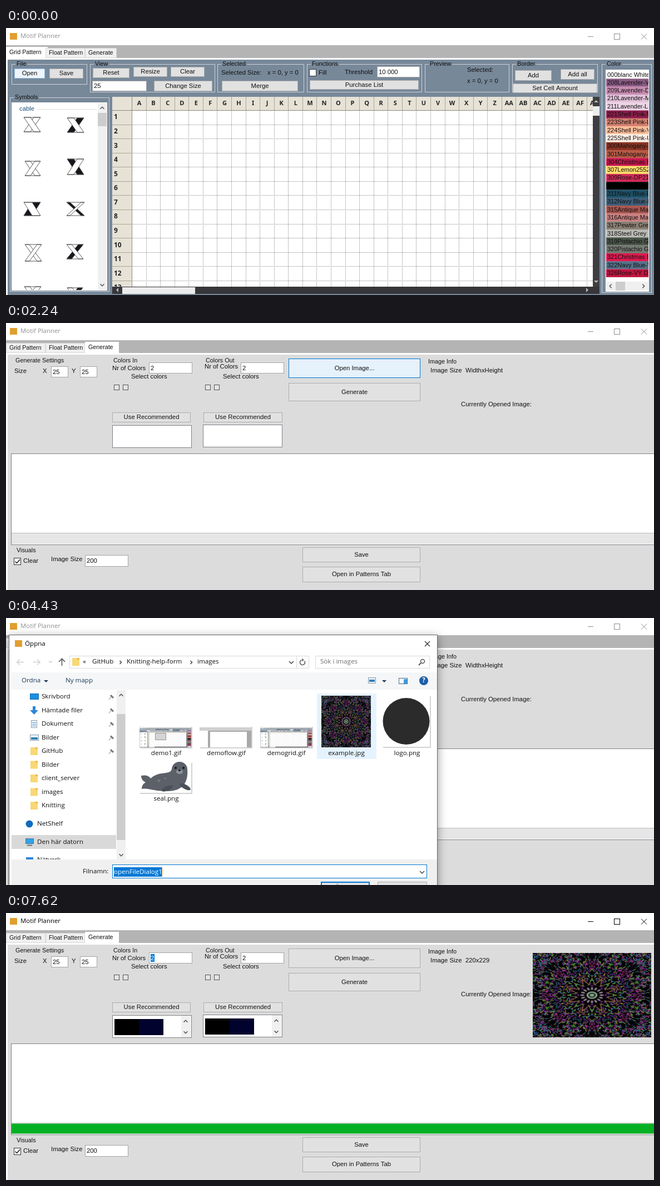
Animation of 1165 by 481 pixels, one loop 8000 ms. Source, as an HTML page with a canvas:

```html
<!DOCTYPE html>
<html lang="en">
<head>
<meta charset="utf-8">
<title>Motif Planner</title>
<style>
html, body { margin: 0; width: 100%; height: 100%; overflow: hidden; background: #fff }
canvas { display: block }
</style>
</head>
<body>
<canvas id="stage" width="1165" height="481"></canvas>
<script>
const LOOP = 8000, SANS = '"Liberation Sans", Arial, sans-serif', UI = '"Open Sans", "Noto Sans", sans-serif';
const BLUE = '#0078d7', SLATE = '#778899';
// moments at which the picture changes
const STEPS = [0, 760, 1060, 1130, 1210, 2000, 2240, 2780, 2860, 2940, 3260, 3340, 3420, 3500, 3880, 4030, 4110,
  4430, 4500, 4580, 4660, 4740, 4830, 4910, 4970, 5140, 5290, 5440, 5610, 5760, 5910, 5990,
  6160, 6230, 6310, 6390, 6460, 6540, 6620, 6690, 7620];
const main = document.getElementById('stage').getContext('2d');
let g = main;

function box(x, y, w, h, fill, stroke, lw = 1) {
  if (fill) { g.fillStyle = fill; g.fillRect(x, y, w, h); }
  if (stroke) {
    g.strokeStyle = stroke; g.lineWidth = lw;
    g.strokeRect(x + lw / 2, y + lw / 2, w - lw, h - lw);
  }
}
function text(s, x, y, { size = 11.3, color = '#111', align = 'left', font = SANS, bold = '' } = {}) {
  g.font = `${bold} ${size}px ${font}`;
  g.fillStyle = color; g.textAlign = align; g.textBaseline = 'middle';
  g.fillText(s, x, y);
}
const ui = (s, x, y, o) => text(s, x, y, { size: 11.6, font: UI, ...o });
function path(points, stroke, lw = 1, fill) {
  g.beginPath();
  points.forEach(([x, y]) => g.lineTo(x, y));
  if (fill) { g.closePath(); g.fillStyle = fill; g.fill(); }
  if (stroke) { g.strokeStyle = stroke; g.lineWidth = lw; g.stroke(); }
}
function disc(x, y, rx, fill, ry = rx, turn = 0) {
  g.beginPath(); g.ellipse(x, y, rx, ry, turn, 0, 7); g.fillStyle = fill; g.fill();
}
function clipped(x, y, w, h, draw) {
  g.save(); g.beginPath(); g.rect(x, y, w, h); g.clip(); draw(); g.restore();
}
// direction: 0 right, 1 down, 2 left, 3 up
function chevron(x, y, dir, color = '#505050', r = 3.5, lw = 1.5) {
  g.save(); g.translate(x, y); g.rotate(dir * Math.PI / 2);
  path([[-r / 2, -r], [r / 2, 0], [-r / 2, r]], color, lw);
  g.restore();
}
function triangle(x, y, dir, color, r = 4) {
  g.save(); g.translate(x, y); g.rotate(dir * Math.PI / 2);
  path([[-r / 2, -r], [r / 2, 0], [-r / 2, r]], null, 0, color);
  g.restore();
}
function button(s, x, y, w, h, fill = '#e1e1e1', stroke = '#adadad', lw = 1) {
  box(x, y, w, h, fill, stroke, lw);
  text(s, x + w / 2, y + h / 2, { align: 'center' });
}
function field(s, x, y, w, h) {
  box(x, y, w, h, '#fff', '#a5a5a5');
  text(s, x + 3, y + h / 2 + .5);
}
function group(s, x, y, w, h) {
  box(x, y, w, h, null, '#cdd3da');
  g.font = '10.8px ' + SANS;
  box(x + 7, y - 1, g.measureText(s).width + 4, 3, SLATE);
  text(s, x + 9, y, { size: 10.8 });
}
function offscreen(w, h, draw) {
  const c = document.createElement('canvas'), old = g;
  c.width = w; c.height = h;
  g = c.getContext('2d'); draw(); g = old;
  return c;
}
function random(seed) {
  return () => (seed = seed * 16807 % 2147483647) / 2147483647;
}

function frame(active, tab, hover) {
  const c = active ? '#000' : '#8f8f8f';
  box(0, 0, 1165, 481, '#fff');
  box(7, 9, 13, 12, '#e0a030');
  ui('Motif Planner', 26, 15.5, { size: 11.4, color: c });
  path([[1046, 15.5], [1056, 15.5]], c);
  box(1093, 10, 11, 11, null, c);
  path([[1142, 10.5], [1152, 20.5]], c);
  path([[1152, 10.5], [1142, 20.5]], c);
  box(0, 31, 1165, 23, '#b4b4b4');
  [['Grid Pattern', 0, 71], ['Float Pattern', 71, 71], ['Generate', 142, 57]].forEach(([s, x, w], i) => {
    const on = i == tab;
    if (on) box(x, 34, w + 4, 22, '#fff');
    else box(x, 36, w, 18, hover && i == 2 ? '#d8eaf9' : '#f0f0f0', '#d9d9d9');
    text(s, x + 6, on ? 44 : 45.5, { size: 10.7 });
  });
}

function symbol(x, y, w, h, flip, dark, band) {
  g.save(); g.translate(x, y); g.scale(flip ? -1 : 1, 1);
  const strip = (s, fill) => path([[-s * w, -h], [-s * (w - band), -h], [s * w, h], [s * (w - band), h]], '#444', .9, fill);
  strip(-1, dark ? '#16161c' : '#fff');
  strip(1, '#fff');
  path([[-w, -h], [w, -h]], '#555');
  path([[-w, h], [w, h]], '#555');
  g.restore();
}

const THREADS = [
  ['000blanc White', '#fff'], ['208Lavender-V', '#8a5a83'], ['209Lavender-D', '#c58bb0'], ['210Lavender-M', '#e3c1da'],
  ['211Lavender-L', '#ecd5e4'], ['221Shell Pink-V', '#8b1d4a'], ['223Shell Pink-L', '#d3806f'], ['224Shell Pink-V', '#fbbd98'],
  ['225Shell Pink-U', '#fff0e6'], ['300Mahogany-', '#8a3424'], ['301Mahogany-', '#b85a45'], ['304Christmas R', '#c7154d'],
  ['307Lemon2552', '#ffdc6a'], ['309Rose-DP21', '#d02a58'], ['', '#000'], ['311Navy Blue-D', '#1c5066'],
  ['312Navy Blue-L', '#3d5d78'], ['315Antique Ma', '#a95650'], ['316Antique Ma', '#c97f7f'], ['317Pewter Grey', '#8a7f74'],
  ['318Steel Grey -', '#b9b9b4'], ['319Pistachio G', '#4a5548'], ['320Pistachio G', '#757a72'], ['321Christmas R', '#e0184f'],
  ['322Navy Blue-V', '#567088'], ['326Rose-VY D', '#c0143f']];

function gridPage() {
  box(3, 57, 1162, 424, SLATE);
  [['File', 10, 65, 136, 37], ['View', 151, 65, 225, 51], ['Selected', 380, 65, 156, 51], ['Functions', 541, 65, 207, 51],
    ['Preview', 753, 65, 152, 51], ['Border', 910, 65, 154, 51], ['Color', 1071, 65, 90, 412], ['Symbols', 7, 125, 179, 350]]
    .forEach(a => group(...a));
  button('Open', 15, 73, 55, 18, '#eef4fb', '#8fc0ea');
  [['Save', 78, 73, 61, 18], ['Reset', 156, 72, 66, 18], ['Resize', 229, 70, 61, 18], ['Clear', 296, 70, 61, 18],
    ['Change Size', 266, 95, 105, 19], ['Merge', 388, 95, 137, 19], ['Purchase List', 546, 94, 196, 17],
    ['Add', 915, 76, 66, 19], ['Add all', 997, 74, 61, 19], ['Set Cell Amount', 911, 100, 152, 17]].forEach(a => button(...a));
  field('25', 155, 95, 98, 19);
  field('10 000', 667, 69, 77, 20);
  box(545, 74, 13, 13, '#fff', '#333');
  [['Selected Size:', 387, 81], ['x = 0, y = 0', 470, 81], ['Fill', 562, 81], ['Threshold', 609, 80],
    ['Selected:', 829, 76], ['x = 0, y = 0', 829, 96]].forEach(a => text(...a));

  box(10, 134, 172, 339, '#fff');
  text('cable', 24, 146, { color: '#1f4e79' });
  path([[56, 146.5], [163, 146.5]], '#dcdcdc');
  clipped(10, 134, 155, 338, () => {
    symbol(47, 174, 15, 13, 0, 0, 12); symbol(125, 175, 15, 13, 0, 1, 12);
    symbol(48, 253, 14, 13, 1, 0, 10); symbol(125, 250, 15, 14, 1, 1, 12);
    symbol(47, 326, 15, 12, 0, 1, 15); symbol(125, 326, 16, 12, 1, 1, 6);
    symbol(49, 405, 15, 15, 1, 0, 8); symbol(124, 403, 15, 13, 0, 1, 9);
    symbol(48, 480, 15, 14, 0, 0, 10); symbol(124, 481, 14, 13, 0, 1, 9);
  });
  box(165, 135, 16, 337, '#f0f0f0');
  box(165, 153, 16, 24, '#cdcdcd');
  chevron(173, 144, 3); chevron(173, 463, 1);

  clipped(191, 124, 864, 342, () => {
    const pitch = 25.57, dots = points => {
      g.setLineDash([1, 1]);
      path(points, '#8a8a8a');
      g.setLineDash([]);
    };
    box(191, 124, 864, 342, '#fff');
    box(191, 124, 864, 24, '#e6e2d6');
    box(191, 124, 35, 342, '#e6e2d6');
    const head = { font: '"Noto Sans", sans-serif', bold: 'bold', size: 11, color: '#222' };
    for (let i = 0; i < 33; i++) {
      const x = Math.round(226 + pitch * i) + .5;
      path([[x, 124], [x, 148]], '#a9a596');
      const name = (i > 25 ? 'A' : '') + String.fromCharCode(65 + i % 26);
      text(name, 239.5 + pitch * i, 136, { ...head, align: 'center' });
      dots([[x, 149], [x, 466]]);
    }
    for (let i = 0; i < 13; i++) {
      const y = Math.round(148 + pitch * i) + .5;
      path([[191, y], [226, y]], '#a9a596');
      text(i + 1, 194, 161 + pitch * i, { ...head, size: 12 });
      dots([[226, y], [1055, y]]);
    }
    path([[191, 148.5], [1055, 148.5]], '#8d897c');
    path([[226.5, 124], [226.5, 466]], '#8d897c');
  });
  box(191, 466, 876, 13, '#36363a');
  box(1055, 124, 12, 342, '#3e3e42');
  box(209, 467, 131, 12, '#ececec');
  box(1055, 141, 12, 17, '#ececec');
  triangle(200, 472, 2, '#bbb'); triangle(1045, 472, 0, '#bbb');
  triangle(1061, 132, 3, '#bbb'); triangle(1061, 457, 1, '#bbb');

  box(1078, 75, 78, 400, '#fff');
  clipped(1079, 76, 76, 380, () => THREADS.forEach(([s, c], i) => {
    const y = 77 + i * 14.3;
    box(1079, y, 76, 14.4, c);
    text(s, 1081, y + 7.5, { size: 11 });
  }));
  box(1079, 457, 76, 16, '#f0f0f0');
  box(1096, 457, 17, 16, '#cdcdcd');
  chevron(1087, 465, 2); chevron(1146, 465, 0);
}

const shot = offscreen(1165, 481, () => { frame(false, 0); gridPage(); });

const mandala = offscreen(220, 229, () => {
  const rnd = random(77), hues = [285, 310, 330, 270, 200, 165, 95, 55, 15];
  box(0, 0, 220, 229, '#050508');
  g.translate(110, 114.5);
  g.lineCap = 'round';
  for (let i = 0; i < 300; i++) {
    const r = 22 + 140 * Math.sqrt(rnd()), a = rnd() * Math.PI / 8, turn = rnd() * 3, len = 2 + rnd() * 6;
    const hue = hues[Math.floor(rnd() * (r < 65 ? 9 : 8))];
    const color = `hsl(${hue} ${35 + rnd() * 30}% ${26 + rnd() * 20}%)`;
    for (let k = 0; k < 16; k++) {
      g.save();
      g.rotate((k >> 1) * Math.PI / 4);
      if (k & 1) g.scale(1, -1);
      g.rotate(a); g.translate(r, 0); g.rotate(turn);
      path([[-len / 2, 0], [len / 2, 0]], color, 1.5);
      g.restore();
    }
  }
  for (let k = 0; k < 16; k++) {
    g.save(); g.rotate(k * Math.PI / 8);
    path([[28, -6], [46, 0], [28, 6]], k & 1 ? '#a87838' : '#7f9a3c', 1.3);
    disc(18, 0, 4, '#857584', 2.2);
    g.restore();
  }
  disc(0, 0, 12, '#101410');
  disc(0, 0, 10, '#8fa08c'); disc(0, 0, 7, '#26382c'); disc(0, 0, 4, '#7d9a80');
});

function swatches(x, y, t) {
  box(x, y, 143, 41, '#fff', '#82828a');
  if (t < 6160) return;
  box(x + 124, y + 1, 17, 39, '#f0f0f0');
  chevron(x + 132, y + 11, 3); chevron(x + 132, y + 31, 1);
  if (t < 6690) return;
  box(x + 4, y + 7, 44, 29, '#000');
  box(x + 48, y + 7, 44, 29, '#02022e');
}

function progress(t) {
  const n = STEPS.indexOf(t);
  if (t >= 6160) return Math.min(1165, 199 + 138 * (n - STEPS.indexOf(6160)));
  return t >= 5140 && t < 5990 ? 19.5 + 119.8 * (n - STEPS.indexOf(5140) + 1) : 10;
}

function generatePage(t) {
  const loaded = t >= 6690, typing = t >= 7620;
  box(3, 57, 1162, 424, '#dcdcdc');
  [['Generate Settings', 17, 68], ['Colors In', 193, 68], ['Colors Out', 359, 68], ['Visuals', 19, 410], ['Image Info', 759, 70]]
    .forEach(a => text(...a, { size: 10.8 }));
  [['Size', 15, 87], ['X', 66, 87], ['Y', 118, 87], ['Nr of Colors', 191, 82], ['Nr of Colors', 357, 79],
    ['Select colors', 225, 97], ['Select colors', 390, 97], ['Image Size', 763, 86], ['Currently Opened Image:', 818, 147],
    ['Clear', 31, 429], ['Image Size', 81, 426], [loaded ? '220x229' : 'WidthxHeight', 826, 86]].forEach(a => text(...a));
  field('25', 81, 78, 31, 20); field('25', 133, 78, 31, 20);
  field('2', 257, 71, 78, 20); field('2', 422, 71, 78, 20);
  field('200', 142, 418, 78, 21);
  if (typing) { box(260, 74, 7, 14, BLUE); text('2', 260, 81.5, { color: '#fff' }); }
  [194, 210, 358, 374].forEach(x => box(x, 111, 10, 10, '#e4e4e4', '#555'));
  button('Use Recommended', 191, 161, 141, 18); button('Use Recommended', 355, 161, 142, 18);
  swatches(191, 184, t); swatches(354, 183, t);
  const hover = t >= 2000 && t < 4740, focus = t >= 4740 && !typing;
  button('Open Image...', 508, 64, 237, 35, hover ? '#e5f1fb' : '#e1e1e1', hover || focus ? BLUE : '#adadad', focus ? 2 : 1);
  button('Generate', 508, 108, 237, 33);
  button('Save', 533, 404, 212, 27); button('Open in Patterns Tab', 533, 439, 212, 28);
  box(9, 235, 1160, 165, '#fff', '#82828a');
  box(10, 379, 1155, 19, '#e6e6e6');
  path([[10, 378.5], [1165, 378.5]], '#bcbcbc');
  box(10, 379.5, progress(t) - 10, 18, '#06b025');
  box(14, 423, 13, 13, '#fff', '#333');
  path([[16.5, 429.5], [19.5, 432.5], [25, 426]], '#111', 1.4);
  if (loaded) g.drawImage(mandala, 947, 72, 213, 152);
}

function folder(x, y) {
  box(x, y - 7, 13, 14, '#f8d775');
  box(x + 9, y - 7, 4, 3, '#e9b949');
}

function sidebar() {
  ['Skrivbord', 'Hämtade filer', 'Dokument', 'Bilder', 'GitHub', 'Bilder', 'client_server', 'images', 'Knitting'].forEach((s, i) => {
    const y = 142 + 24.5 * i;
    ui(s, 64, y);
    if (i > 3) folder(44, y);
    if (i < 5) {
      path([[188, y - 3], [193, y + 2]], '#777', 3);
      path([[185, y + 5], [189, y]], '#777');
    }
  });
  box(43, 136, 16, 11, '#1b8fe0', '#0c6cb5');
  path([[48, 159], [53, 159], [53, 166], [58, 166], [50.5, 174], [43, 166], [48, 166]], null, 0, '#2b86d9');
  box(45, 184, 11, 14, '#fff', '#8a98a8');
  [188, 191, 194].forEach(y => path([[47, y + .5], [54, y + .5]], '#3d8fd1'));
  box(43, 210, 16, 11, '#eaf4fb', '#8a98a8');
  box(45, 215, 12, 4, '#2f7fb8');
  disc(42, 371, 6.5, '#0f6cbd');
  ui('NetShelf', 56, 371);
  box(10, 391, 188, 25, '#d9d9d9');
  box(35, 397, 15, 10, '#2ea3e8', '#5c7385');
  path([[38, 409.5], [47, 409.5]], '#5c7385', 2);
  ui('Den här datorn', 56, 404);
  clipped(10, 420, 188, 15, () => {
    box(36, 431, 13, 9, '#2b86d9');
    ui('Nätverk', 56, 436);
  });
}

function toolbar() {
  path([[32, 79.5], [20, 79.5], [25, 74.5]], '#d0d0d0', 1.5);
  path([[20, 79.5], [25, 84.5]], '#d0d0d0', 1.5);
  path([[49, 79.5], [61, 79.5], [56, 74.5]], '#d0d0d0', 1.5);
  path([[61, 79.5], [56, 84.5]], '#d0d0d0', 1.5);
  chevron(80, 79, 1, '#d0d0d0', 3);
  path([[95, 79], [100.5, 73.5], [106, 79]], '#555', 1.6);
  path([[100.5, 74], [100.5, 86]], '#555', 1.6);
  box(114, 68, 431, 23, '#fff', '#d9d9d9');
  path([[522.5, 69], [522.5, 90]], '#d9d9d9');
  folder(119, 79);
  ui('«', 138, 79); ui('GitHub', 155, 79); ui('Knitting-help-form', 217, 79); ui('images', 344, 79);
  chevron(206, 80, 0, '#444', 3); chevron(333, 80, 0, '#444', 3); chevron(513, 80, 1, '#444', 4);
  g.beginPath(); g.arc(533, 80, 4.5, -.6, 4.4); g.strokeStyle = '#555'; g.lineWidth = 1.5; g.stroke();
  triangle(534, 75.5, 0, '#555', 3);
  box(556, 68, 206, 23, '#fff', '#d9d9d9');
  ui('Sök i images', 565, 79, { color: '#6d6d6d' });
  g.beginPath(); g.arc(749, 78, 3.5, 0, 7); g.strokeStyle = '#555'; g.lineWidth = 1.5; g.stroke();
  path([[746, 81], [742, 85]], '#555', 2);
  box(10, 98, 765, 31, '#f5f6f7');
  ui('Ordna', 28, 113, { color: '#1e395b' }); ui('Ny mapp', 107, 113, { color: '#1e395b' });
  triangle(72, 114, 1, '#1e395b'); triangle(680, 114, 1, '#1e395b');
  box(651, 107, 14, 11, '#eaf4fb', '#8a98a8'); box(653, 111, 10, 4, '#2f7fb8');
  box(706, 108, 16, 11, '#fff', '#44688c'); box(715, 110, 6, 8, '#3d9be0');
  disc(751, 113, 8, '#1c5fa8');
  ui('?', 751, 113, { color: '#fff', align: 'center', bold: 'bold' });
}

function card(x, y, w, h) {
  box(x + 1, y + 1, w + 1, h + 1, '#d2d2d2');
  box(x, y, w, h, '#fff');
}
function seal() {
  const c = '#5b6069';
  card(240, 260, 93, 55);
  g.beginPath();
  g.moveTo(298, 272);
  g.bezierCurveTo(296, 284, 276, 274, 260, 289);
  g.bezierCurveTo(256, 283, 249, 283, 243, 284);
  g.bezierCurveTo(243, 291, 247, 294, 251, 296);
  g.bezierCurveTo(246, 299, 244, 303, 244, 308);
  g.bezierCurveTo(258, 306, 262, 312, 290, 312);
  g.bezierCurveTo(318, 312, 328, 296, 326, 272);
  g.fillStyle = c; g.fill();
  disc(312, 273, 14, c);
  disc(322, 304, 11, '#4a4f58', 4, .5);
  disc(290, 307, 11, '#4a4f58', 4, -.4);
  disc(275, 293, 3, '#737983', 2); disc(286, 289, 2.5, '#737983', 1.6);
  disc(305, 270, 2, '#15171a'); disc(319, 270, 2, '#15171a');
  disc(312, 277, 6, '#8c929b', 4); disc(312, 274.5, 2.2, '#15171a', 1.5);
}
function files(t) {
  if (t >= 4500) box(559, 136, 107, 118, '#cce8ff', '#99d1ff');
  else if (t >= 4110) box(559, 136, 107, 118, '#e5f3ff');
  else if (t >= 4030) box(343, 136, 107, 118, '#e5f3ff');
  g.imageSmoothingQuality = 'high';
  [240, 457].forEach(x => {
    card(x, 195, 93, 38);
    g.drawImage(shot, x, 195, 93, 38);
  });
  box(268, 207, 20, 13, '#d4d4d4', '#999');
  card(348, 195, 93, 38);
  box(348, 197, 93, 6, '#d0d0d0');
  box(363, 203, 78, 30, '#a8a8a8'); box(367, 205, 66, 28, '#fff');
  g.drawImage(mandala, 567, 140, 89, 93);
  card(677, 140, 85, 92);
  disc(719.5, 186, 42, '#2b2b2b');
  seal();
  [['demo1.gif', 288], ['demoflow.gif', 396], ['demogrid.gif', 504], ['example.jpg', 612], ['logo.png', 721]]
    .forEach(([s, x]) => ui(s, x, 244, { align: 'center' }));
  ui('seal.png', 288, 326, { align: 'center' });
}

function titleBar() {
  box(16, 40, 13, 12, '#e0a030');
  ui('Öppna', 34, 46.5, { color: '#000' });
  path([[753, 42], [762, 51]], '#222', 1.1);
  path([[762, 42], [753, 51]], '#222', 1.1);
}

function dialog(t) {
  const closing = t >= 4740;
  g.save();
  g.shadowColor = closing ? 'transparent' : 'rgba(0,0,0,.4)'; g.shadowBlur = 16; g.shadowOffsetY = 4;
  box(5, 30, 771, 560, '#fff');
  g.restore();
  box(5, 30, 771, 560, null, closing ? '#bbb' : '#666');
  if (closing) ui('Öppna', 14, 46);
  else titleBar();
  box(199, 130, 16, 305, '#f0f0f0');
  box(199, 173, 15.5, 227, '#cdcdcd');
  chevron(207, 139, 3); chevron(207, 427, 1);
  box(10, 435, 765, 150, '#f0f0f0');
  if (t < 3260) {
    box(139, 449, 47, 15, '#fff'); box(191, 444, 566, 25, '#fff');
    box(565, 474, 90, 25, '#fff'); box(667, 474, 90, 25, '#fff');
    return;
  }
  toolbar();
  sidebar();
  if (t >= 3420) files(t);
  ui('Filnamn:', 138, 457);
  box(191, 444, 566, 25, '#fff', BLUE);
  chevron(748, 458, 1, '#444', 4);
  if (t >= 4500) ui('example.jpg', 195, 457);
  else {
    box(194, 449, 87, 17, BLUE);
    ui('openFileDialog1', 194, 457.5, { color: '#fff' });
    if (t < 3880 || t >= 4430) box(280, 449, 1, 17, '#ff8728');
  }
  box(566, 475, 88, 24, '#e1e1e1', BLUE, 2);
  box(668, 475, 89, 24, '#e1e1e1', '#adadad');
  ui('Öppna', 610, 486, { align: 'center' });
  ui('Avbryt', 713, 486, { align: 'center' });
}

const layer = offscreen(1165, 600, () => {}), layerContext = layer.getContext('2d');
function showDialog(t) {
  g = layerContext;
  g.clearRect(0, 0, 1165, 600);
  dialog(t);
  g = main;
  const enter = Math.min(1, (t - 2700) / 240), leave = Math.max(0, (t - 4700) / 270);
  const scale = t < 3000 ? .92 + .08 * enter : 1 - .0817 * leave;
  g.save();
  g.globalAlpha = t < 3000 ? enter : (1 - leave) ** 2.4;
  if (leave > .4) g.globalCompositeOperation = 'multiply';
  g.translate(364, 265); g.scale(scale, scale);
  g.drawImage(layer, -364, -265);
  g.restore();
}

function render(now) {
  const time = now % LOOP, t = STEPS.filter(s => s <= time).pop();
  const generate = t >= 1130;
  frame(t >= 1060 && t < 2240 || t >= 4740, generate ? 2 : 0, t >= 760);
  if (generate) generatePage(t); else gridPage();
  if (t >= 2780 && t < 4970) showDialog(t);
  requestAnimationFrame(() => render(performance.now() - start));
}
const start = performance.now();
render(0);
</script>
</body>
</html>
```
